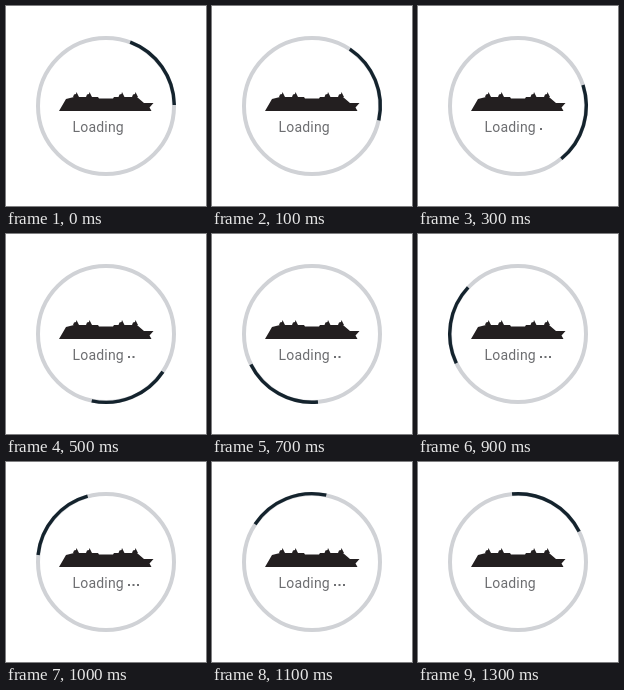
An HTML page with a canvas that plays this animation: 200 by 200 pixels, repeating every 1400 ms.

```html
<!DOCTYPE html>
<html lang="en">
<head>
<meta charset="utf-8">
<title>Loading</title>
<style>
  html, body { margin: 0; width: 100%; height: 100%; overflow: hidden; background: #fff; }
  canvas { display: block; width: 200px; height: 200px; }
</style>
</head>
<body>
<canvas id="stage"></canvas>
<script>
const LOOP = 1400, STEPS = 14;
const TURN = 360 / STEPS, SWEEP = 68.5;

const canvas = document.getElementById('stage');
const ctx = canvas.getContext('2d');
const dpr = window.devicePixelRatio || 1;
canvas.width = canvas.height = 200 * dpr;
ctx.scale(dpr, dpr);

const rad = deg => deg * Math.PI / 180;
const easeOut = (x, a, b) =>
  Math.sin(Math.PI / 2 * Math.min(1, Math.max(0, (x - a) / (b - a))));

// Steady turning that lags one step early in the loop and catches up later
function tailAngle(step) {
  const lead = 1 - easeOut(step, 0, 3) + easeOut(step, 7, 11);
  return -95 + TURN * (step + lead);
}

function arc(from, to, radius, width, color) {
  ctx.beginPath();
  ctx.arc(100, 100, radius, rad(from), rad(to));
  ctx.strokeStyle = color;
  ctx.lineWidth = width;
  ctx.stroke();
}

function shape(...points) {
  ctx.beginPath();
  points.forEach(([x, y]) => ctx.lineTo(x, y));
  ctx.closePath();
  ctx.fill();
}

function ship() {
  ctx.fillStyle = '#231f20';
  shape([53, 105], [60, 93], [68, 91], [92, 91], [93, 92.5], [107, 92.5],
    [108, 91], [131, 91], [138, 97], [147.5, 97], [143.5, 101.5], [145.5, 105]);
  for (const x of [70, 83, 115.5, 129]) {
    shape([x - 3, 91], [x - 2, 88.5], [x, 88], [x + 0.5, 86], [x + 3, 91]);
  }
}

function label(dots) {
  ctx.fillStyle = '#6d6e71';
  ctx.font = '14px Roboto, "Liberation Sans", sans-serif';
  ctx.letterSpacing = '0.2px';
  ctx.fillText('Loading', 66.5, 126);
  for (let i = 0; i < dots; i++) ctx.fillRect(122 + i * 4.5, 122, 2, 2);
}

function draw(now) {
  const step = Math.floor((now % LOOP) / LOOP * STEPS);
  const tail = tailAngle(step);
  ctx.fillStyle = '#fff';
  ctx.fillRect(0, 0, 200, 200);
  arc(0, 360, 68, 4, '#d0d2d6');
  arc(tail, tail + SWEEP, 68.3, 3.4, '#14232d');
  ship();
  label(Math.floor((step + 2) % STEPS / STEPS * 4));
}

const start = performance.now();
function tick() {
  draw(performance.now() - start);
  requestAnimationFrame(tick);
}
tick();
</script>
</body>
</html>
```
